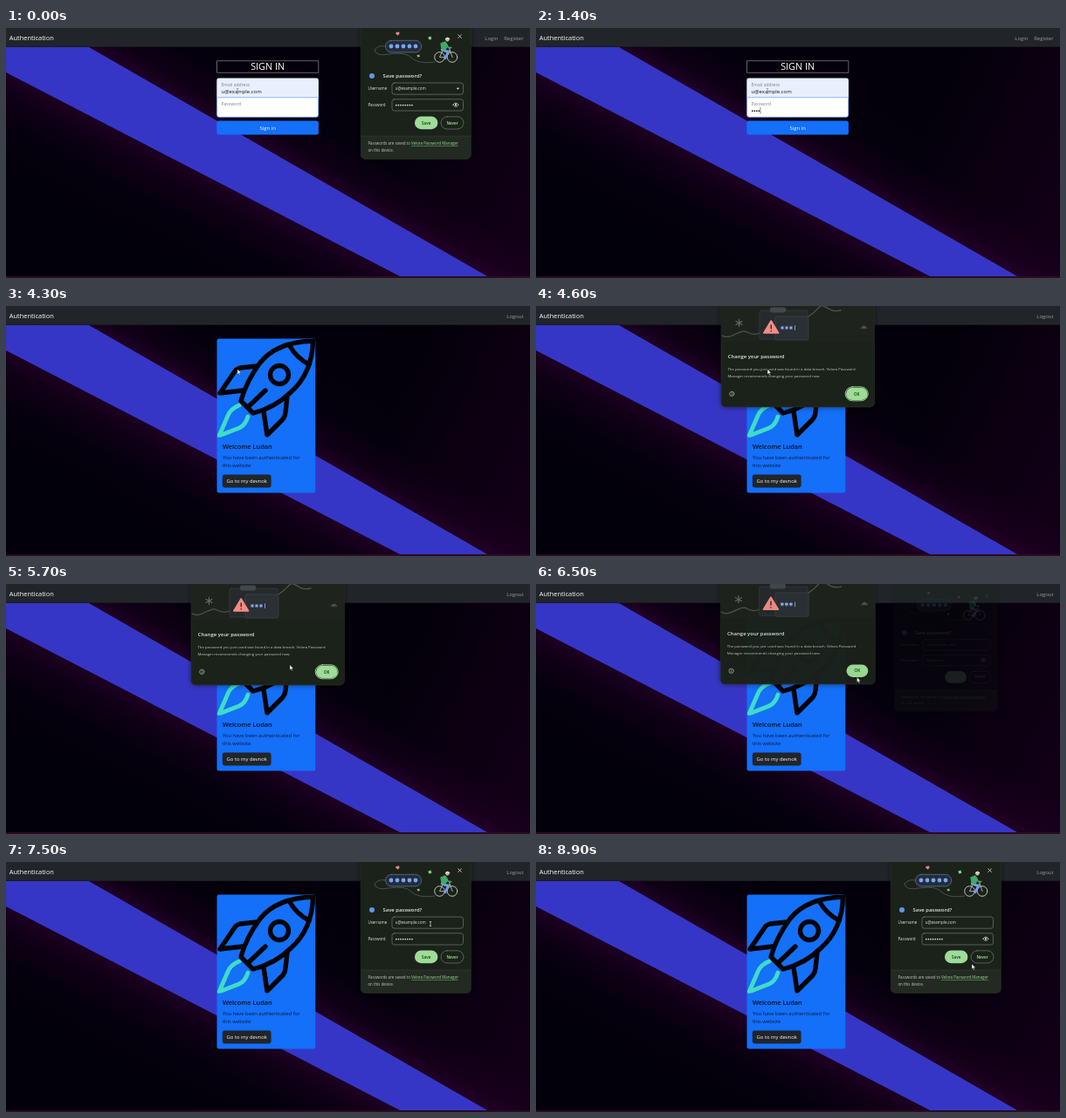
Write an HTML page with a canvas that moves like this. It is 600x287 px and loops after 9 s.

```html
<!DOCTYPE html>
<html lang="en">
<head>
<meta charset="utf-8">
<title>Authentication</title>
<style>
html, body { margin: 0; width: 100%; height: 100%; overflow: hidden; background: #05000c; }
canvas { display: block; width: 600px; height: 287px; }
</style>
</head>
<body>
<canvas id="stage"></canvas>
<script>
const LOOP = 9000, W = 600, H = 287;
const EMAIL = 'u@example.com';
const canvas = document.getElementById('stage');
const c = canvas.getContext('2d');
const dpr = window.devicePixelRatio || 1;
canvas.width = W * dpr;
canvas.height = H * dpr;

const clamp = v => Math.max(0, Math.min(1, v));
const span = (t, a, b) => clamp((t - a) / (b - a));
const ease = p => p * p * (3 - 2 * p);
const mix = (a, b, p) => a + (b - a) * p;

function text(s, x, y, size, color, weight = 400, align = 'left') {
  c.font = `${weight} ${size}px "Open Sans", "Noto Sans", sans-serif`;
  c.textAlign = align;
  c.fillStyle = color;
  c.fillText(s, x, y);
  return c.measureText(s).width;
}

function box(x, y, w, h, r, fill, stroke, lw = 0.6) {
  c.beginPath();
  c.roundRect(x, y, w, h, r);
  paint(fill, stroke, lw);
}

function paint(fill, stroke, lw = 1) {
  if (fill) { c.fillStyle = fill; c.fill(); }
  if (stroke) { c.strokeStyle = stroke; c.lineWidth = lw; c.stroke(); }
}

function disc(x, y, r, fill, stroke, lw) {
  c.beginPath();
  c.arc(x, y, r, 0, Math.PI * 2);
  paint(fill, stroke, lw);
}

function poly(points, fill, stroke, lw, closed = true) {
  c.beginPath();
  points.forEach(([x, y]) => c.lineTo(x, y));
  if (closed) c.closePath();
  paint(fill, stroke, lw);
}

function curve(d, stroke, lw, fill) {
  const path = new Path2D(d);
  if (fill) { c.fillStyle = fill; c.fill(path); }
  c.strokeStyle = stroke;
  c.lineWidth = lw;
  c.stroke(path);
}

function dots(n, x, y, step, r, color) {
  for (let i = 0; i < n; i++) disc(x + i * step, y, r, color);
}

function glow(x, y, dx, dy, stops) {
  const g = c.createLinearGradient(x, y, x + dx, y + dy);
  stops.forEach(([at, color]) => g.addColorStop(at, color));
  return g;
}

// Blue beam on black, with faint magenta along both edges
function background() {
  c.fillStyle = '#02000a';
  c.fillRect(0, 0, W, H);
  poly([[90, 22], [W, 22], [W, H], [545, H]], glow(268, 122, 90, -156, [
    [0, '#1f0026'], [0.1, '#100016'], [0.3, '#04000c'], [1, '#03000a']]));
  poly([[0, 46], [458, H], [0, H]], glow(200, 155, -72, 138, [
    [0, '#1d0022'], [0.14, '#100016'], [0.36, '#05000d'], [0.7, '#02000a'], [1, '#02000a']]));
  c.fillStyle = glow(430, 160, 170, 60, [[0, 'rgba(40,0,40,0)'], [1, 'rgba(40,0,40,.4)']]);
  c.fillRect(430, 22, 170, 265);
  poly([[0, 22], [95, 22], [551, 285], [451, 285], [0, 51]], '#3636c6');
  c.fillStyle = '#2c0a20';
  c.fillRect(0, 285, W, 2);
}

function navbar(signedIn) {
  c.fillStyle = '#212529';
  c.fillRect(0, 0, W, 21.7);
  text('Authentication', 3.8, 14, 7.45, '#fff');
  const grey = '#9b9d9f';
  if (signedIn) text('Logout', 592.6, 13.6, 5.95, grey, 400, 'right');
  else {
    text('Login', 548.3, 13.6, 5.95, grey);
    text('Register', 592.6, 13.6, 5.95, grey, 400, 'right');
  }
}

const KEYS = [900, 1200, 1200, 1400, 1600, 1900, 2200, 2500];

function signIn(t) {
  box(241.5, 37.7, 116.3, 13.6, 0, null, '#8d8a93', 0.7);
  text('SIGN IN', 299.6, 48.4, 10.8, '#fff', 400, 'center');

  box(241.3, 57.6, 116.6, 22.6, [2.4, 2.4, 0, 0], '#e8f0fe');
  text('Email address', 246.5, 66.7, 5.05, '#7c838c');
  text(EMAIL, 246.6, 74.8, 5.95, '#15181c');

  box(240.8, 79, 117.6, 23.9, 2.6, 'rgba(13,110,253,.28)');
  box(241.6, 79.9, 116, 22.3, [0, 0, 2.4, 2.4], '#fff', '#86b7fe', 0.6);
  text('Password', 246.5, 89.1, 5.05, '#7c838c');
  const typed = KEYS.filter(k => t >= k).length;
  dots(typed, 247.8, 95.2, 2.53, 0.85, '#15181c');
  if (t >= 600 && !(t >= 2900 && t < 3400)) {
    c.fillStyle = '#15181c';
    c.fillRect(246.6 + typed * 2.53, 91, 0.5, 7.6);
  }

  box(241.3, 106.5, 116.6, 16.1, 2.4, '#146ff9');
  text('Sign in', 299.6, 116.8, 5.95, '#fff', 400, 'center');
}

function rocket() {
  c.save();
  c.beginPath();
  c.rect(241.6, 37.8, 112.6, 113);
  c.clip();
  c.lineJoin = c.lineCap = 'round';
  const ink = '#020306';
  curve('M267 114 Q257 118 254 126 L244 149 L267 140 Q274 137 277 127', '#3fdcc8', 4.8);
  curve('M351.5 40 C322 41 303 50 291 65 C280 80 273 94 269 109 L283 123 C299 119 314 111 326 99 C343 84 351 65 351.5 40 Z', ink, 5.4);
  curve('M325 46 Q333 60 347 67', ink, 5.4);
  curve('M287 69 L268 71 Q264 72 262 75 L245 100 L271 97', ink, 5.4);
  curve('M322 104 L320 122 Q320 126 317 130 L299 148 L295 121', ink, 5.4);
  curve('M277 116 L297 97', ink, 5.4);
  disc(313, 79, 10.5, null, ink, 5.4);
  c.restore();
}

function card() {
  box(241.5, 37.6, 112.8, 177, 2.4, '#146ff9');
  rocket();
  text('Welcome Ludan', 247.9, 163.7, 7.4, '#0b1222', 600);
  text('You have been authenticated for', 247.9, 176, 5.85, '#0c1830');
  text('this website', 247.9, 185.4, 5.85, '#0c1830');
  box(247.8, 193.6, 55.8, 14.8, 2.4, '#212529');
  text('Go to my devnok', 275.7, 203.2, 5.85, '#fff', 400, 'center');
}

function panel(x, w, h, fill) {
  c.save();
  c.shadowColor = 'rgba(0,0,0,.55)';
  c.shadowBlur = 6 * dpr;
  box(x, -6, w, h + 6, 5, fill);
  c.restore();
  box(x, -6, w, h + 6, 5, null, '#30392f', 0.5);
}

function cyclist() {
  const pale = '#c9d2cc';
  c.lineCap = c.lineJoin = 'round';
  disc(496.5, 33.5, 5.8, null, pale, 0.9);
  disc(511, 33.5, 5.8, null, pale, 0.9);
  poly([[496.5, 33.5], [500, 26], [508.5, 26], [503, 33.5]], null, pale, 0.8);
  poly([[511, 33.5], [507.5, 23], [510, 22.5]], null, pale, 0.8, false);
  poly([[499, 25], [506, 27.5], [503, 35]], null, '#6f9cf0', 2.4, false);
  poly([[499, 24], [498, 18], [503, 16], [505.5, 20], [503, 25]], '#3fa968', '#3fa968', 1.4);
  poly([[503.5, 18], [506, 22], [509, 22.5]], null, '#3fa968', 1.6, false);
  disc(505.5, 13.6, 2, '#d8b7a4');
  curve('M503.4 13 Q505 9.8 507.7 12.6', '#dfe6df', 1.2);
}

function saveArt() {
  c.lineCap = 'round';
  curve('M422 25 Q427 19 434 21 M422 25 Q423 33 438 30 Q458 27 464 34 Q472 42 491 39', '#667068', 0.6);
  box(434.5, 14.3, 41.2, 13.6, 6.8, '#232d3a', '#647ca8', 0.7);
  dots(5, 441, 21, 7, 2.4, '#7ba4f5');
  disc(447.5, 6, 1.2, '#ee8a91');
  disc(449.3, 5.7, 1.2, '#ee8a91');
  poly([[446.4, 6.5], [450.4, 6.2], [448.9, 8.7]], '#ee8a91');
  poly([[483.3, 10.5], [486.6, 9.6], [487.3, 12.7], [484.3, 13.6]], '#77d47e');
  poly([[470.4, 31.4], [473, 30.4], [474, 32.8], [471.5, 33.6]], '#7fc785');
  cyclist();
}

function eye() {
  curve('M511.8 88.2 Q515 83.8 518.2 88.2 Q515 92.4 511.8 88.2', '#dce4da', 0.8);
  disc(515, 88.1, 1.1, '#dce4da');
}

function saveDialog(t) {
  const pale = '#e2e8df', line = '#7f8b7d';
  panel(406.2, 126.2, 150.5, '#1b221a');
  box(406.4, 124, 125.8, 26.3, [0, 0, 5, 5], '#222a21');
  c.fillStyle = '#394238';
  c.fillRect(406.4, 123.8, 125.8, 0.5);
  saveArt();
  poly([[517.7, 7.7], [521.5, 11.5]], null, pale, 0.75, false);
  poly([[521.5, 7.7], [517.7, 11.5]], null, pale, 0.75, false);
  disc(419, 55, 3, '#5e96e8');
  text('Save password?', 431.5, 57.2, 5.9, pale, 600);

  text('Username', 414.4, 71.1, 4.5, pale);
  box(442, 63, 81.5, 13.2, 2.6, null, line);
  text(EMAIL, 445.7, 71.1, 4.5, pale);
  if (t < 1000) poly([[515.7, 68.7], [519.1, 68.7], [517.4, 70.7]], pale);

  text('Password', 414.4, 89.9, 4.5, pale);
  box(442, 81.8, 81.5, 13.2, 2.6, null, line);
  dots(8, 446.8, 88.6, 2.6, 0.85, pale);
  if (t < 7000 || t >= 7800) eye();

  box(468, 101.6, 26.4, 14.6, 7.3, '#9edc98');
  text('Save', 481.2, 110.5, 4.6, '#123a18', 600, 'center');
  box(498, 101.8, 26, 14.2, 7.1, null, line);
  text('Never', 511, 110.5, 4.6, '#a9dfa3', 600, 'center');

  const lead = text('Passwords are saved to ', 414.4, 134.2, 4.45, '#c1c9be');
  const x = 414.4 + lead;
  const link = text('Velora Password Manager', x, 134.2, 4.45, '#9edc98');
  c.fillStyle = '#9edc98';
  c.fillRect(x, 135.1, link, 0.4);
  text('on this device.', 414.4, 142.1, 4.45, '#c1c9be');
}

function star(x, y, r, color, lw) {
  for (let i = 0; i < 3; i++) {
    const a = Math.PI / 2 + i * Math.PI / 3, dx = r * Math.cos(a), dy = r * Math.sin(a);
    poly([[x - dx, y - dy], [x + dx, y + dy]], null, color, lw, false);
  }
}

function changeArt() {
  c.fillStyle = '#1e231e';
  c.fillRect(212.3, 0, 175, 41);
  c.lineCap = c.lineJoin = 'round';
  curve('M213 34 C224 40 233 25 242 30 Q249 34 256 31 M312 12 C328 2 322 -5 335 3 Q340 7 349 5', '#4d544d', 1.3);
  star(232.5, 19.5, 4, '#666d66', 1.1);
  box(256, 5, 55, 33, 2, '#262a2c', '#3c4245', 0.6);
  box(268, 1.5, 18, 6, 2, '#42484c');
  box(274, 12, 38, 27, 2, '#2b3034', '#41484d', 0.6);
  poly([[269.2, 17], [277.6, 31], [260.8, 31]], '#f08c85', '#f08c85', 1.6);
  c.fillStyle = '#33191a';
  c.fillRect(268.6, 21.5, 1.3, 5);
  disc(269.2, 28.7, 0.8, '#33191a');
  for (let i = 0; i < 3; i++) star(282 + i * 5, 25, 1.7, '#8fb4fa', 1);
  c.fillStyle = '#8fb4fa';
  c.fillRect(296, 22.3, 0.8, 5.6);
  curve('M372 25.5 Q375.5 20 379 25.5 Z', '#50574f', 0.5, '#50574f');
}

function changeDialog(focused) {
  const pale = '#e2e8df', soft = '#c1c9be';
  panel(212, 175.5, 116, '#1b221a');
  changeArt();
  text('Change your password', 219.8, 60.2, 5.9, pale, 600);
  text('The password you just used was found in a data breach. Velora Password', 219.4, 74.2, 4.3, soft);
  text('Manager recommends changing your password now.', 219.4, 81.9, 4.3, soft);
  disc(224.3, 100.9, 2.6, null, soft, 0.7);
  c.fillStyle = soft;
  c.fillRect(223.95, 100.4, 0.7, 2);
  c.fillRect(223.95, 99.1, 0.7, 0.7);
  if (focused) box(354.2, 92.8, 26, 16, 8, null, '#b9efb2', 0.8);
  box(355, 93.8, 24.6, 14.2, 7.1, '#9edc98');
  text('OK', 367.2, 102.5, 4.6, '#123a18', 600, 'center');
}

// Draws a popup faded and scaled about its centre
function popup(alpha, scale, cx, cy, dy, draw) {
  if (alpha <= 0) return;
  c.save();
  c.globalAlpha = alpha;
  c.translate(cx, cy + dy);
  c.scale(scale, scale);
  c.translate(-cx, -cy);
  draw();
  c.restore();
}

function arrow(x, y) {
  poly([[0, 0], [0, 6], [1.4, 4.8], [2.3, 6.9], [3.3, 6.5], [2.4, 4.4], [4.2, 4.3]]
    .map(([a, b]) => [x + a, y + b]), '#fff', '#111', 0.4);
}

function beam(x, y, color) {
  c.fillStyle = color;
  c.fillRect(x - 0.3, y - 2.8, 0.6, 5.6);
  c.fillRect(x - 1.2, y - 3, 2.4, 0.5);
  c.fillRect(x - 1.2, y + 2.5, 2.4, 0.5);
}

// Pointer stops: time, x, y
const STOPS = [[5200, 265, 72.5], [6100, 367.5, 107], [6600, 367.5, 107],
  [7400, 486, 71], [7600, 486, 71], [8500, 499, 117]];

function pointer(t) {
  if (t < 4200) return beam(265, 72.3, '#6b6f76');
  let [, x, y] = STOPS[0];
  for (let i = 1; i < STOPS.length; i++) {
    const [t0, x0, y0] = STOPS[i - 1], [t1, x1, y1] = STOPS[i];
    if (t < t0) break;
    const p = ease(span(t, t0, t1));
    x = mix(x0, x1, p);
    y = mix(y0, y1, p);
  }
  const overField = x > 442 && y > 63 && y < 95;
  if (overField) beam(x, y, '#fff');
  else arrow(x, y);
}

function draw(t) {
  c.setTransform(dpr, 0, 0, dpr, 0, 0);
  c.lineCap = 'butt';
  c.lineJoin = 'miter';
  const signedIn = t >= 4200;
  background();
  navbar(signedIn);
  if (signedIn) card();
  else signIn(t);

  const shown = signedIn ? span(t, 6460, 6800) : 1 - span(t, 600, 800);
  popup(shown, mix(0.935, 1, shown), 469, 75, 0, () => saveDialog(t));

  const opened = span(t, 4350, 4600);
  const pressed = span(t, 6300, 6500), closing = span(t, 6490, 6800);
  const grow = mix(0.92, 1, ease(opened)) + 0.009 * pressed;
  popup(opened * (1 - closing), grow, 299.7, 58, -1.5 * pressed, () => changeDialog(t < 6300));

  pointer(t);
}

const start = performance.now();
function frame() {
  draw((performance.now() - start) % LOOP);
  requestAnimationFrame(frame);
}
frame();
</script>
</body>
</html>
```
